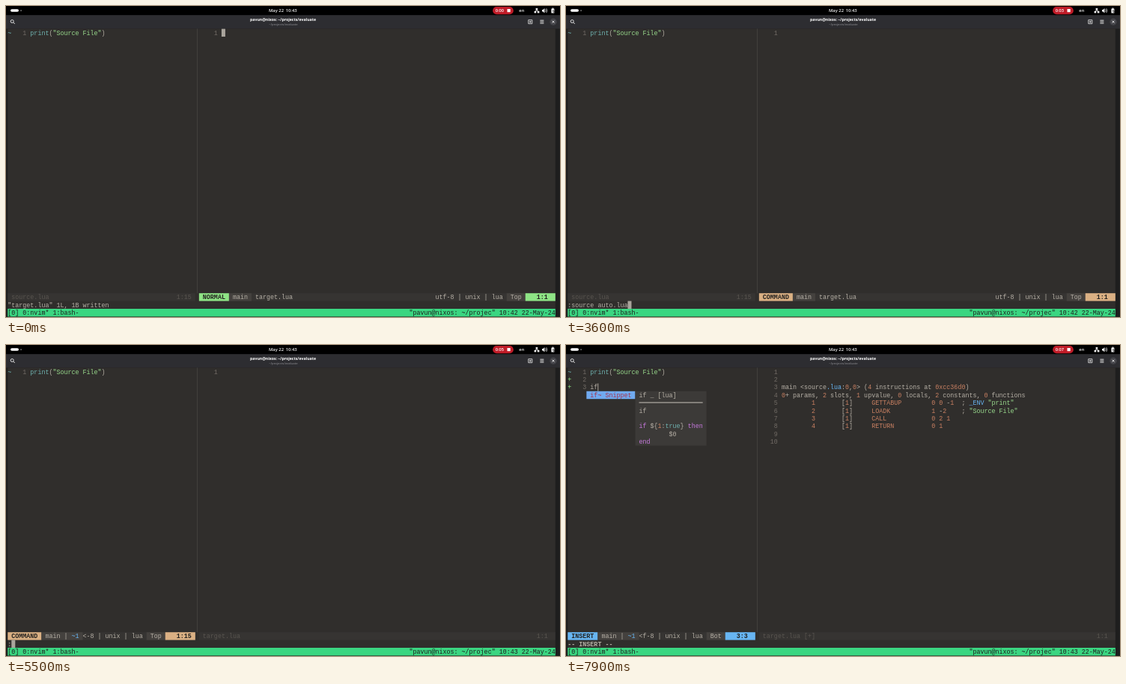
An HTML page with a canvas for the animation above (8000 ms loop, 740 px wide and 416 px high).

```html
<!DOCTYPE html>
<html lang="en">
<head>
<meta charset="utf-8">
<title>Terminal session</title>
<style>
  html, body { margin: 0; width: 740px; height: 416px; overflow: hidden; background: #1e1e1e; }
  canvas { display: block; }
</style>
</head>
<body>
<canvas id="stage" width="740" height="416"></canvas>
<script>
const ctx = document.getElementById('stage').getContext('2d');
const LOOP = 8000, CELL_W = 5.0104, CELL_H = 10.4, LEFT = 2.3, TOP = 30.6;
const USER = 'pavun';
const C = {
  bg: '#302e2c', bar: '#363432', section: '#44413e', popup: '#3c3a38',
  text: '#b5afa5', dim: '#716b65', faint: '#595550', rule: '#45423f',
  green: '#8ee485', tan: '#dab083', blue: '#67b5f2', orange: '#c98062',
  purple: '#c678dd', teal: '#6fb2b0', string: '#98d98c', tmux: '#3ad681', dark: '#242220'
};
const MODES = { NORMAL: C.green, COMMAND: C.tan, INSERT: C.blue };

const COMMAND = ':source auto.lua';
const KEY_TIMES = [1200, 1300, 1400, 1500, 1700, 1800, 1900, 2000, 2500, 2700, 2800, 2900, 3000, 3300, 3400, 3500];
const RUN = 3800, SWITCH = 5200, COLON = 5500, WRITE = 5700, DUMP = 5900;
const OPEN = 6700, NEWLINE = 6900, TYPE_I = 7300, TYPE_F = 7400, MENU = 7500, DOC = 7600;

const LISTING = [
  [2, 57, 'main <source.lua:0,0> (4 instructions at 0xcc36d0)'],
  [3, 57, '0+ params, 2 slots, 1 upvalue, 0 locals, 2 constants, 0 functions']
];
[['GETTABUP', '0 0 -1', '; _ENV "print"'], ['LOADK', '1 -2', '; "Source File"'],
 ['CALL', '0 2 1', ''], ['RETURN', '0 1', '']].forEach(([op, args, note], i) => {
  const row = i + 4;
  LISTING.push([row, 65, `${i + 1}`], [row, 73, '[1]'], [row, 81, op], [row, 97, args], [row, 105, note]);
});

const colX = col => LEFT + col * CELL_W;
const rowY = row => TOP + row * CELL_H;

function rect(x, y, w, h, color) {
  ctx.fillStyle = color;
  ctx.fillRect(x, y, w, h);
}

function cells(row, col, cols, color, rows = 1) {
  rect(colX(col), rowY(row), cols * CELL_W, rows * CELL_H, color);
}

function put(row, col, text, color = C.text, bg, bold) {
  if (bg) cells(row, col, text.length, bg);
  ctx.font = `${bold ? 'bold ' : ''}8.35px "Liberation Mono", monospace`;
  ctx.textAlign = 'left';
  ctx.fillStyle = color;
  [...text].forEach((ch, i) => ch !== ' ' && ctx.fillText(ch, colX(col + i), rowY(row) + 7.9));
}

function tokenColor(token) {
  if (/^"/.test(token)) return C.string;
  if (/^(_ENV|\.lua)$/.test(token)) return C.blue;
  if (/^(if|then|end)$/.test(token)) return C.purple;
  if (/^(print|true)$/.test(token)) return C.teal;
  return /^(\d|[A-Z]+$)/.test(token) ? C.orange : C.text;
}

function code(row, col, text) {
  for (const m of text.matchAll(/"[^"]*"|\.lua|\w+|[^\w"]/g))
    put(row, col + m.index, m[0], tokenColor(m[0]));
}

function label(text, x, y, size, color = '#fff', align = 'center', weight = 'bold') {
  ctx.font = `${weight} ${size}px "Open Sans", sans-serif`;
  ctx.textAlign = align;
  ctx.fillStyle = color;
  ctx.fillText(text, x, y);
}

function round(x, y, w, h, r, color) {
  ctx.fillStyle = color;
  ctx.beginPath();
  ctx.roundRect(x, y, w, h, r);
  ctx.fill();
}

function stroke(path, width = 0.9, color = '#f2f2f2') {
  ctx.strokeStyle = color;
  ctx.lineWidth = width;
  ctx.stroke(new Path2D(path));
}

function desktop(t) {
  rect(0, 0, 740, 416, '#1e1e1e');
  rect(0, 0, 740, 12.3, '#000');
  round(6, 4.2, 11, 3.6, 1.8, '#fff');
  round(19.2, 5.2, 1.8, 1.8, 0.9, '#8a8a8a');
  label('May 22', 351, 8.1, 5.8, '#f2f2f2', 'left', 600);
  label('10:43', 388.5, 8.1, 5.8, '#f2f2f2', 'right', 600);
  round(650.2, 1.1, 27.6, 10.1, 5.05, '#c01c28');
  label(`0:0${Math.floor(t / 1000)}`, 653.8, 8.2, 5.7, '#fff', 'left', 600);
  rect(669.5, 4, 4.2, 4.2, '#fff');
  label('en', 688.8, 8.1, 5.7, '#f2f2f2', 'center', 600);

  // network, speaker, battery
  rect(707.6, 3, 2.6, 2.4, '#f2f2f2');
  rect(705.6, 7, 2.6, 2.4, '#f2f2f2');
  rect(709.8, 7, 2.6, 2.4, '#f2f2f2');
  stroke('M709 5V6.4M707 7V6.4H711V7', 0.7);
  ctx.fillStyle = '#f2f2f2';
  ctx.fill(new Path2D('M716 5h1.4l2-2v6.4l-2-2H716z'));
  stroke('M720.6 4.4q1.2 1.8 0 3.6M721.8 3.2q2 3 0 6', 0.7);
  round(728.4, 3.4, 4, 6.2, 0.7, '#f2f2f2');
  rect(729.4, 2.6, 2, 1, '#f2f2f2');
  stroke('M731.6 5l-1.4 2h2.4l-1.4 2', 0.6, '#000');

  rect(0, 12.3, 740, 18.1, '#2d2d31');
  label(`${USER}@nixos: ~/projects/evaluate`, 370, 19.9, 5.2);
  label('~/projects/evaluate', 370.3, 26.4, 4.3, '#929296', 'center', 400);
  stroke('M10.2 20.5a2 2 0 1 1-4 0a2 2 0 1 1 4 0M9.8 22l2 2');
  stroke('M697.8 18.7h5v5h-5zM700.3 19.8v2.8M698.9 21.2h2.8', 0.8);
  stroke('M713.4 19.2h5M713.4 21.2h5M713.4 23.2h5', 0.9);
  round(726.4, 16.6, 9.2, 9.2, 4.6, '#45454a');
  stroke('M729.5 19.7l3 3M732.5 19.7l-3 3');
}

function statusRight(mode, filled) {
  cells(34, 51, 95, C.bar);
  if (!mode) {
    put(34, 52, 'target.lua' + (filled ? ' [+]' : ''), C.faint);
    put(34, 141, '1:1', C.faint);
    return;
  }
  const tag = ` ${mode} `, end = 51 + tag.length;
  put(34, 51, tag, C.dark, MODES[mode], true);
  put(34, end, ' main ', C.text, C.section);
  put(34, end + 7, 'target.lua');
  put(34, 114, 'utf-8 | unix | lua');
  put(34, 133, ' Top ', C.text, C.section);
  put(34, 138, '   1:1  ', C.dark, MODES[mode], true);
}

function statusLeft(mode, position, scroll) {
  cells(34, 0, 50, C.bar);
  if (!mode) {
    put(34, 1, 'source.lua', C.faint);
    put(34, 45, '1:15', C.faint);
    return;
  }
  const tag = ` ${mode} `, end = tag.length;
  put(34, 0, tag, C.dark, MODES[mode], true);
  put(34, end, ' main |    ', C.text, C.section);
  put(34, end + 8, '~1', C.blue);
  put(34, end + 11, mode === 'COMMAND' ? '<-8' : '<f-8');
  put(34, 24, '| unix | lua');
  put(34, 37, ` ${scroll} `, C.text, C.section);
  put(34, 42, position.padStart(position.length + 3).padEnd(8), C.dark, MODES[mode], true);
}

function completion(t) {
  if (t < MENU) return;
  put(3, 5, ' if~ Snippet ', '#a8324a', '#70aaf0');
  if (t < DOC) return;
  cells(3, 18, 19, C.popup, 7);
  put(3, 19, 'if _ [lua]');
  rect(colX(19), 76.5, 17 * CELL_W, 1, '#c9c4bb');
  put(5, 19, 'if');
  code(7, 19, 'if ${1:true} then');
  put(8, 27, '$0');
  code(9, 19, 'end');
}

function editor(t) {
  const onLeft = t >= SWITCH, filled = t >= DUMP, inserting = t >= OPEN;
  const command = t >= KEY_TIMES[0] && t < RUN || t >= COLON && t < DUMP;
  const mode = inserting ? 'INSERT' : command ? 'COMMAND' : 'NORMAL';
  const lines = t >= NEWLINE ? 3 : inserting ? 2 : 1;
  const word = t >= TYPE_F ? 'if' : t >= TYPE_I ? 'i' : '';

  rect(LEFT, 30.4, 146 * CELL_W, rowY(37) - 30.4, C.bg);
  rect(255, 30.4, 0.9, rowY(34) - 30.4, C.rule);

  put(0, 0, '~', C.teal);
  for (let i = 0; i < lines; i++) {
    if (i) put(i, 0, '+', C.green);
    put(i, 4, `${i + 1}`, C.dim);
  }
  code(0, 6, 'print("Source File")');
  put(2, 6, word);
  for (let i = 1; i <= (filled ? 10 : 1); i++) put(i - 1, 54, `${i}`.padStart(2), C.dim);
  if (filled) LISTING.forEach(item => code(...item));

  if (inserting) rect(colX(6 + word.length), rowY(lines - 1), 0.9, CELL_H, C.text);
  else if (!command && onLeft) put(0, 20, 'F', C.dark, C.green);
  else if (!command) cells(0, 57, 1, '#aaa59d');
  completion(t);

  statusLeft(onLeft && mode, inserting ? `${lines}:${word.length + 1}` : '1:15', inserting ? 'Bot' : 'Top');
  statusRight(!onLeft && mode, filled);

  let message = '"target.lua" 1L, 1B written';
  if (inserting) message = '-- INSERT --';
  else if (filled) message = 'table: 0x7f712da7d9b8';
  else if (t >= COLON) message = t >= WRITE ? ':w' : ':';
  else if (t >= KEY_TIMES[0]) message = COMMAND.slice(0, KEY_TIMES.filter(k => k <= t).length);
  put(35, 0, message, C.text, null, inserting);
  if (command) cells(35, message.length, 1, '#aaa59d');

  cells(36, 0, 146, C.tmux);
  put(36, 0, '[0] 0:nvim* 1:bash-', '#1e1e1e');
  put(36, 107, `"${USER}@nixos: ~/projec" 10:${t < 4000 ? 42 : 43} 22-May-24`, '#1e1e1e');
}

function draw() {
  const t = performance.now() % LOOP;
  desktop(t);
  editor(t);
  requestAnimationFrame(draw);
}
draw();
</script>
</body>
</html>
```
